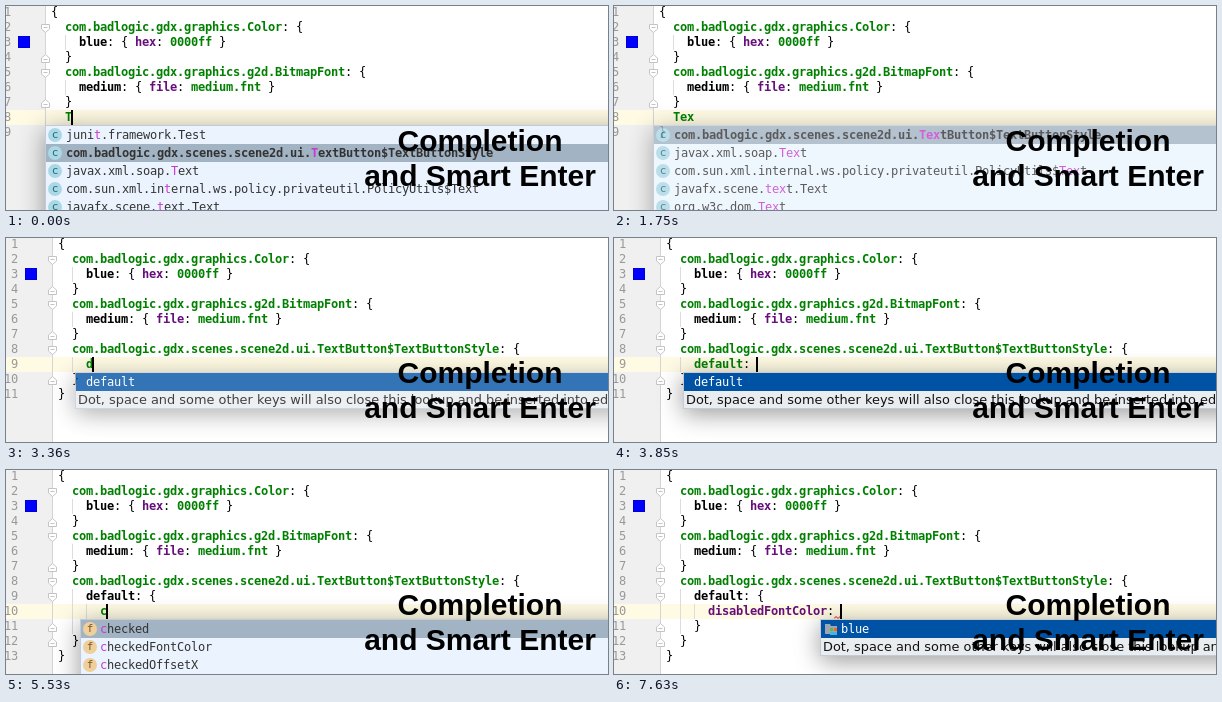
Animation of 602 by 204 pixels, one loop 8000 ms. Source, as an HTML page:

```html
<!DOCTYPE html>
<html lang="en">
<head>
<meta charset="utf-8">
<title>Completion and Smart Enter</title>
<style>
html, body { margin: 0; width: 100%; height: 100%; overflow: hidden; background: #fff; }
#stage {
  position: relative; width: 602px; height: 204px; overflow: hidden; background: #fff;
  font: 12px/15px "DejaVu Sans Mono", monospace; letter-spacing: var(--track, 0); color: #000;
}
#stage div, #stage svg { position: absolute; white-space: pre; }
.gutter { top: 0; left: 0; height: 204px; background: #f0f0f0; }
.edge { top: 0; width: 1px; height: 204px; background: #d4d4d4; }
.row { left: 0; width: 602px; height: 15px; background: #fffae3; }
.num { width: 30px; text-align: right; color: #999; }
.guide { width: 1px; height: 15px; background: #dcdcdc; }
.swatch { top: 30px; width: 12px; height: 12px; background: #00f; box-shadow: inset 0 0 0 1px rgba(0, 0, 0, .16); }
.caret { width: 2px; height: 15px; background: #000; }
.type, .str { color: #008000; }
.name { color: #000; }
.prop { color: #660e7a; }
.fold { fill: #fff; stroke: #c4c4c4; }
.wave { fill: none; stroke: #f00; }
.popup {
  width: 640px; background: #ebf4fe; border: 1px solid #c3ccd6; box-sizing: border-box;
  box-shadow: 0 5px 24px rgba(0, 0, 0, .4);
}
.faint { opacity: .8; }
.item { left: 0; width: 640px; height: 18px; line-height: 18px; color: #333; }
.item i { font-style: normal; color: #c73ad0; }
.chosen { background: #a2b4c4; }
.blue { background: #e9edf0; }
.blue .chosen { background: #0052a4; color: #fff; }
.icon { top: 2px; width: 14px; height: 14px; border-radius: 50%; font-size: 11px; line-height: 13px; text-align: center; letter-spacing: 0; }
.icon.c { background: #a9d8e6; color: #2f6577; }
.icon.f { background: #efcf9c; color: #7a5420; }
.hint { left: 2px; top: 18px; font: 12.9px/17px "DejaVu Sans", sans-serif; letter-spacing: 0; color: #111; }
#caption { left: 273.5px; top: 117px; width: 401px; text-align: center; font: bold 30px/35px "Liberation Sans", Arial, sans-serif; letter-spacing: 0; }
</style>
</head>
<body>
<div id="stage"><div id="view"></div><div id="caption">Completion
and Smart Enter</div></div>
<script>
const LOOP = 8000, CHAR = 7, LINE = 15;
const stage = document.getElementById('stage');
const view = document.getElementById('view');

const head = [
  ['{'],
  ['  com.badlogic.gdx.graphics.Color: {', 'type'],
  ['    blue: { hex: 0000ff }', 'name'],
  ['  }'],
  ['  com.badlogic.gdx.graphics.g2d.BitmapFont: {', 'type'],
  ['    medium: { file: medium.fnt }', 'name'],
  ['  }']
];
const style = 'com.badlogic.gdx.scenes.scene2d.ui.TextButton$TextButtonStyle';
const texts = ['javax.xml.soap.Text', 'com.sun.xml.internal.ws.policy.privateutil.PolicyUtils$Text', 'javafx.scene.text.Text'];
const hint = 'Dot, space and some other keys will also close this lookup and be inserted into editor';

const typed = s => [['  ' + s, 'type'], ['}']];
const inStyle = (s, kind) => [['  ' + style + ': {', 'type'], ['    ' + s, kind], ['  }'], ['}']];
const inDefault = (s, kind = 'type') =>
  [['  ' + style + ': {', 'type'], ['    default: {', 'name'], ['      ' + s, kind], ['    }'], ['  }'], ['}']];

const classes = (hit, sel, ...items) => ({ left: 39, top: 119, icon: 'c', pad: 20, hit, sel, items });
const fields = (hit, ...items) => ({ left: 74, top: 149, icon: 'f', pad: 19, hit, sel: 0, items });
const allClasses = hit => classes(hit, 1, 'junit.framework.Test', style, ...texts);
const texOnly = classes('Tex', 0, style, ...texts, 'org.w3c.dom.Text');
const defaults = { left: 69, top: 134, pad: 10, sel: 0, blue: true, items: ['default'] };
const colors = { left: 206, top: 149, icon: 'res', pad: 20, sel: 0, blue: true, items: ['blue'] };
const checkedList = fields('c', 'checked', 'checkedFontColor', 'checkedOffsetX');
const faint = p => ({ ...p, faint: true });

// Each step changes only the listed parts of the one before.
const steps = [
  { at: 0, shift: 0, code: typed('T'), caret: [8, 3], popup: allClasses('T'), opens: [2, 5], closes: [4, 7], wave: null },
  { at: 210, code: typed('Te'), caret: [8, 4], popup: allClasses('Te') },
  { at: 630, code: typed('Tex'), caret: [8, 5], popup: null },
  { at: 700, popup: faint(texOnly) },
  { at: 770, popup: texOnly },
  { at: 1540, caret: null },
  { at: 1750, popup: faint(texOnly) },
  { at: 1820, code: typed(style + ': '), caret: [8, 65], popup: null },
  { at: 2100, wave: [8, 64], opens: [2, 5, 8], closes: [4, 7, 9] },
  { at: 2310, code: typed(style + ': {}'), caret: [8, 66] },
  { at: 2660, code: inStyle(''), caret: [9, 4], wave: null, opens: [2, 5], closes: [4, 7] },
  { at: 2870, shift: 7 },
  { at: 3150, opens: [2, 5, 8], closes: [4, 7, 10] },
  { at: 3360, code: inStyle('d', 'type'), caret: [9, 5], popup: faint(defaults) },
  { at: 3430, popup: defaults },
  { at: 3850, code: inStyle('default: ', 'type'), caret: [9, 13] },
  { at: 3920, popup: null },
  { at: 4200, code: inStyle('default: ', 'name') },
  { at: 4270, wave: [9, 12] },
  { at: 4410, code: inStyle('default: {}', 'name'), caret: [9, 14] },
  { at: 4760, wave: null },
  { at: 4970, code: inDefault(''), caret: [10, 6], closes: [4, 7, 12] },
  { at: 5320, opens: [2, 5, 8, 9], closes: [4, 7, 11, 12] },
  { at: 5460, code: inDefault('c'), caret: [10, 7], popup: faint(checkedList) },
  { at: 5530, popup: checkedList },
  { at: 6020, code: inDefault('co'), caret: [10, 8], popup: fields('co', 'checkedOffsetX', 'checkedOffsetY', 'checkedOver') },
  { at: 6510, code: inDefault('col'), caret: [10, 9], popup: fields('col', 'disabledFontColor', 'checkedFontColor', 'checkedOverFontColor') },
  { at: 7070, code: inDefault('disabledFontColor: '), caret: [10, 25], popup: null },
  { at: 7350, code: inDefault('disabledFontColor: ', 'prop'), wave: [10, 24] },
  { at: 7560, popup: faint(colors) },
  { at: 7630, popup: colors }
];
const states = [];
for (const s of steps) states.push({ ...states[states.length - 1], ...s });

const lineTop = n => LINE * n - 16;
const box = (cls, left, top, html = '', extra = '') =>
  `<div class="${cls}" style="left:${left}px;top:${top}px;${extra}">${html}</div>`;

function paint([text, kind]) {
  const [, indent, key, rest] = text.match(/^( *)([^{}:]*)(.*)$/);
  return indent + `<b class="${kind}">${key}</b>` +
    rest.replace(/\{ (\w+): (\S+) \}/, '{ <b class="prop">$1</b>: <b class="str">$2</b> }');
}

function guides(text, left, top) {
  const indent = text.match(/^ */)[0].length;
  let html = '';
  for (let col = 2; col < indent; col += 2) html += box('guide', left + col * CHAR, top);
  return html;
}

function fold(line, x, closing) {
  const d = closing ? 'M.5 8.5H8.5V4L4.5.5L.5 4Z M2.5 5.5H6.5' : 'M.5.5H8.5V5L4.5 8.5L.5 5Z M2.5 3.5H6.5';
  return `<svg class="fold" width="9" height="9" style="left:${x}px;top:${LINE * line - 12}px"><path d="${d}"/></svg>`;
}

function icon(kind) {
  if (kind !== 'res') return `<div class="icon ${kind}" style="left:2px">${kind}</div>`;
  return '<svg width="14" height="14" style="left:3px;top:2px"><path d="M1 2h5l1 2h6v8H1z" fill="#9aa7b0"/>' +
    '<path d="M6 6h3v3H6z" fill="#62b543"/><path d="M10 6h3v3h-3z" fill="#f26522"/><path d="M6 10h7v3H6z" fill="#40b6e0"/></svg>';
}

function mark(text, hit) {
  const i = hit ? text.toLowerCase().indexOf(hit.toLowerCase()) : -1;
  if (i < 0) return text;
  const end = i + hit.length;
  return `${text.slice(0, i)}<i>${text.slice(i, end)}</i>${text.slice(end)}`;
}

function popup(p) {
  const rows = p.items.map((text, i) => {
    const label = mark(text, p.hit);
    const body = text === style ? `<b>${label}</b>` : label;
    return box('item' + (i === p.sel ? ' chosen' : ''), 0, i * 18,
      (p.icon ? icon(p.icon) : '') + box('', p.pad, 0, body));
  }).join('');
  const height = p.blue ? 37 : p.items.length * 18 + 60;
  return box('popup' + (p.faint ? ' faint' : '') + (p.blue ? ' blue' : ''), p.left, p.top,
    rows + (p.blue ? `<div class="hint">${hint}</div>` : ''), `height:${height}px`);
}

function render(s) {
  const left = 45 + s.shift, edge = 39 + s.shift;
  const lines = [...head, ...s.code];
  const active = s.caret ? s.caret[0] : 8;
  let html = `<div class="gutter" style="width:${edge}px"></div>` +
    box('row', 0, lineTop(active)) + `<div class="edge" style="left:${edge}px"></div>` +
    `<div class="swatch" style="left:${12 + s.shift}px"></div>`;
  lines.forEach((line, i) => {
    const top = lineTop(i + 1);
    html += guides(line[0], left, top) + box('num', s.shift - 25, top, i + 1) + box('', left, top, paint(line));
  });
  html += s.opens.map(n => fold(n, edge - 4, false)).join('') + s.closes.map(n => fold(n, edge - 4, true)).join('');
  if (s.wave) {
    const [n, col] = s.wave;
    html += `<svg class="wave" width="8" height="3" style="left:${left + col * CHAR}px;top:${lineTop(n) + 12}px"><path d="M0 2.5L2 .5L4 2.5L6 .5L7.5 2"/></svg>`;
  }
  if (s.caret) html += box('caret', left + s.caret[1] * CHAR - 1, lineTop(active));
  if (s.popup) html += popup(s.popup);
  view.innerHTML = html;
}

// Snap the monospace advance to whole pixels, as a hinted editor does.
view.innerHTML = `<div>${'m'.repeat(100)}</div>`;
const advance = view.firstChild.getBoundingClientRect().width / 100;
stage.style.setProperty('--track', `${CHAR - advance}px`);

let shown = null;
const start = performance.now();
function tick() {
  const t = (performance.now() - start) % LOOP;
  const s = states.findLast(x => x.at <= t) || states[0];
  if (s !== shown) render(shown = s);
  requestAnimationFrame(tick);
}
tick();
</script>
</body>
</html>
```
